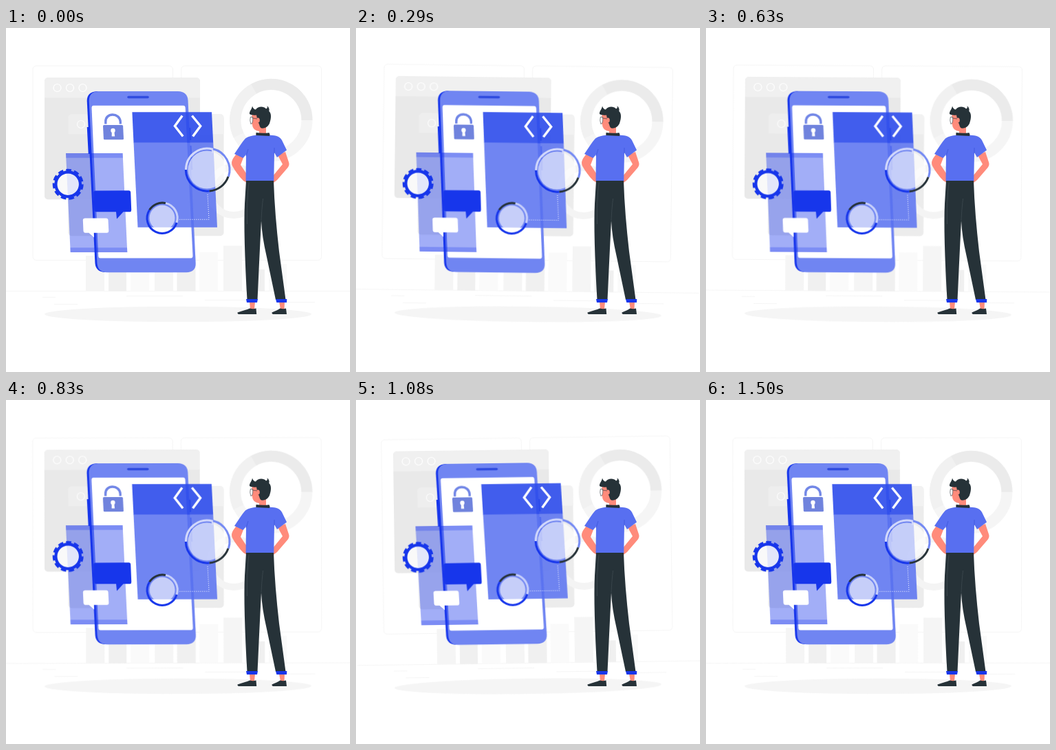
Recreate the animation shown at these times as an HTML page without scripts. Size 500 by 500 pixels, loop 1.54 s.

```html
<!DOCTYPE html>
<html lang="en">
<head>
<meta charset="utf-8">
<title>Mobile app development</title>
<style>
  html, body { margin: 0; width: 100%; height: 100%; overflow: hidden; background: #fff; }
  svg { display: block; width: 100%; height: 100%; }

  .sway { animation: sway 1540ms infinite; }
  #scene { transform-origin: 250px 228px; }
  #shadow { transform-origin: 250px 416px; }
  #device { transform-origin: 196px 224px; }

  /* 24 pictures per second: 9 up, 18 across, 9 back */
  @keyframes sway {
    0% { transform: rotate(0deg); animation-timing-function: steps(9); }
    24.3% { transform: rotate(1deg); animation-timing-function: steps(18); }
    73% { transform: rotate(-1deg); animation-timing-function: steps(9); }
    97.3%, 100% { transform: rotate(-.05deg); }
  }

  .blue { fill: #1736eb; }
  .ink { fill: #263238; }
  .skin { fill: #ff8b7b; }
  .line { fill: none; stroke: #ebebeb; stroke-width: .5; }
  .ring { fill: none; stroke-width: 3; }
  .white-line { fill: none; stroke: #fff; }
  .g1 { fill: #f5f5f5; }
  .g2 { fill: #f0f0f0; }
  .g3 { fill: #fafafa; }
</style>
</head>
<body>
<svg viewBox="0 0 500 500" xmlns="http://www.w3.org/2000/svg">
  <defs>
    <g id="browser">
      <rect width="226" height="177" rx="5" fill="#e9e9e9"/>
      <path class="g2" d="M0 29V5a5 5 0 0 1 5-5H221a5 5 0 0 1 5 5V29Z"/>
      <g class="white-line" stroke-width="1.2">
        <circle cx="18.5" cy="14.7" r="5.5"/>
        <circle cx="37" cy="14.7" r="5.5"/>
        <circle cx="55.5" cy="14.7" r="5.5"/>
      </g>
    </g>
  </defs>

  <g id="scene" class="sway">
    <path class="line" d="M0 382.4H500M53 391.3H72M70 401.5H104M175 389.6H257M289 395.5H350M404 398.6H449"/>
    <rect class="line" x="39" y="55" width="203.5" height="282.5" rx="5"/>
    <rect class="line" x="254.7" y="55" width="203.8" height="282.5" rx="5"/>

    <path class="g1" d="M116 331h27v51.4h-27zM216 331h27v51.4h-27zM316 316.5h27v65.9h-27z"/>
    <path class="g2" d="M149 331h26v51.4h-26zM248.5 331h27v51.4h-27zM348.5 351h27.5v31.4h-27.5z"/>
    <path class="g3" d="M181 331h27v51.4h-27zM281 326h27v56.4h-27zM382 343h26v39.4h-26z"/>

    <use href="#browser" x="56" y="72.3"/>
    <use href="#browser" x="90.5" y="125.3" opacity=".85"/>

    <g fill="none" stroke-width="16">
      <circle cx="385.5" cy="134" r="52" stroke="#f5f5f5"/>
      <path d="M338 156A52 52 0 0 1 360 88.500" stroke="#f1f1f1"/>
      <path d="M360 88.500A52 52 0 0 1 437.500 134" stroke="#ebebeb"/>
    </g>
    <circle cx="331" cy="237" r="35" fill="none" stroke="#f4f4f4" stroke-width="10"/>
  </g>

  <ellipse id="shadow" class="sway g1" cx="250" cy="416" rx="194" ry="11.3"/>

  <g id="device" class="sway">
    <!-- phone -->
    <path class="blue" d="M132 92H145V355H143Q130.500 354 129.500 342L117.700 106Q117.500 93 132 92Z"/>
    <path fill="none" stroke="#1736eb" stroke-width="2.500" d="M119 144L121 183M267 145L268 163M268.300 171L270 206"/>
    <path fill="#7085f2" d="M134 92H250Q263.500 92.500 264.500 105L275.700 342Q276 355 262 355.300H147Q133.500 355 132.500 342L120.700 106Q120.500 93 134 92Z"/>
    <path fill="#fff" d="M127 112.800H258Q260.500 113 260.700 116L271.500 331Q271.500 334.300 269 334.500H137Q134.500 334.500 134.300 332L124.500 116Q124.500 113 127 112.800Z"/>
    <path fill="none" stroke="#304cdf" stroke-width="3.500" stroke-linecap="round" d="M178 100.500H206"/>

    <!-- lock -->
    <path fill="none" stroke="#7186e6" stroke-width="3.400" d="M144.800 139.500V136.500C144 122.500 165.500 122.500 166.300 136.500V139.500"/>
    <path fill="#7083dd" d="M142.500 141H168.500Q170 141 170.100 142.500L171 161Q171 162.300 169.500 162.300H143.500Q142 162.300 141.900 161L141 142.500Q141 141 142.500 141Z"/>
    <circle cx="155.500" cy="149" r="3.200" fill="#fff"/>
    <path fill="#fff" d="M153.800 150H157.300L158.200 157.500H153.700Z"/>

    <!-- side card -->
    <path class="blue" opacity=".4" d="M87 182H169.600L176.300 326H93.700Z"/>
    <path class="blue" opacity=".27" d="M87 182H169.600L169.900 188.700H87.300ZM93.400 319.300H176L176.300 326H93.700Z"/>

    <!-- code card -->
    <path fill="#5870f0" opacity=".85" d="M185.500 166.500H301.200L307 289.700H191.500Z"/>
    <path fill="#2d4cec" opacity=".9" d="M183.400 122.200H299L301.200 166.700H185.500Z"/>
    <path class="white-line" stroke-width="3.400" d="M256.200 127.500L245.400 142.500L257.200 157.500M270.400 127.500L282.700 142.500L271.600 157.500"/>
    <path class="white-line" stroke-width="1" stroke-dasharray="1 2" d="M293 242L295 278.300H251"/>

    <!-- large dial -->
    <circle cx="292" cy="206" r="27.500" fill="#fff" opacity=".6"/>
    <g class="ring">
      <path stroke="#d3d9fb" d="M261.500 206A30.800 30.800 0 0 1 300.500 176.300V182"/>
      <path stroke="#7389f3" d="M301 175.800A31.500 31.500 0 0 1 323.500 216"/>
      <path stroke="#263238" d="M323 216A31.500 31.500 0 0 1 295.500 237"/>
      <path stroke="#1736eb" d="M295.500 237A31.500 31.500 0 0 1 261.300 206"/>
    </g>

    <!-- small dial -->
    <circle cx="227" cy="276" r="18.500" fill="#fff" opacity=".6"/>
    <g class="ring" stroke-width="2.500">
      <path stroke="#263238" d="M208.500 264.500A22 22 0 0 1 232 254.600"/>
      <path stroke="#c8d0fa" d="M232 254.600A22 22 0 0 1 248 283"/>
      <path stroke="#1736eb" d="M248 283A22 22 0 1 1 208.500 264.500"/>
    </g>

    <!-- gear -->
    <circle cx="90.200" cy="227.200" r="16" fill="#fff" opacity=".72"/>
    <circle cx="90.200" cy="227.200" r="17.800" fill="none" stroke="#1736eb" stroke-width="4.200"/>
    <circle cx="90.200" cy="227.200" r="20.600" fill="none" stroke="#1736eb" stroke-width="3.800" pathLength="110" stroke-dasharray="6.500 3.500"/>

    <!-- speech bubbles -->
    <path class="blue" d="M130 236.500L178.500 236.200Q181 236.200 181.200 239L182.200 264.500Q182.200 267.200 180 267.300H170.500L161 277.500L160 267.300H131Q128.500 267.300 128.300 264.500L127.300 239.500Q127.300 236.700 130 236.500Z"/>
    <path fill="#fff" d="M114.500 276.400H146Q148.300 276.400 148.500 279L149.300 295Q149.300 297.700 147 297.800H127.700L128 304.500L120.500 297.800H115Q112.700 297.700 112.500 295L111.800 279Q111.900 276.500 114.500 276.400Z"/>
  </g>

  <g id="man">
    <!-- arms -->
    <path class="skin" d="M335 183C329 190 326.500 195 329 200.500C333 208 339 216 345 222L351 225.500V214L341 199L346 186Z"/>
    <path class="skin" d="M395 185L402 198L388 215V225.500L394 221L409.500 203Q412.500 199 411 195L406 180Z"/>

    <!-- head -->
    <path class="skin" d="M358 123C357 129 357 133 356 138.500L358 140C358 145 361 149 368 150V154H378V140L376 122Z"/>
    <path class="ink" d="M354 125C353.500 121 357 119 358 113.500C359 117 361 118.500 363 118.500C366 114 374 113 378 117.500C380 117 380.500 115 379.500 113C382 115 383.300 118 382.300 121C386 124 385.500 131 383.500 137C382 143 377 146.500 371 145.500C368 144 368.500 138 366 137L364 126.500C360 127 356 126.500 354 125Z"/>
    <ellipse class="skin" cx="366.200" cy="134" rx="2.600" ry="3.600"/>
    <path fill="#fff" stroke="#263238" stroke-width=".6" d="M355.300 129.500H358.500Q359.500 139 355.800 139.500Q354 134 355.300 129.500ZM358.500 131L365 132"/>

    <!-- shirt -->
    <path fill="#586ff0" d="M364 155.800H384C393 156 398 158 401 163L408 177.500L394 188L390 181L389.300 222.500H348.500L349 184L344.500 189L332 183C338 174 343 166 348 160.500C352 157.500 358 156.500 364 155.800Z"/>
    <path fill="none" stroke="#3d55dc" stroke-width=".8" d="M349 186L352 176M390 182L390 174"/>
    <path class="ink" d="M363.500 152Q373 153.500 382.500 152.300Q384 154.500 383 157Q373 156.500 363.300 156Z"/>

    <!-- legs -->
    <path class="skin" d="M354 398H362L361 409H355ZM397 398H405L404.500 409H399Z"/>
    <path class="ink" d="M349 222H389C390 255 393 290 397 325L406.500 395H392L379 333Q372 303 371 280Q368 340 365.500 395H350.500Q345 300 347 255Z"/>
    <path fill="none" stroke="#4b565c" stroke-width=".5" d="M373.500 248Q371.500 265 371 280M353 225Q350 250 350.500 285"/>
    <path class="blue" d="M349 394H366L365 399H350ZM392 394H408.300L408 399H393.300Z"/>
    <path class="ink" d="M336.500 413.500C344 411 350 409.500 354.500 407.500Q359 409 363.500 407.500L364.200 416H338Q336 415 336.500 413.500ZM386.500 413.500C391 411.500 395 410 398.500 407.500Q403 409 407 407.500L408 416H388Q386 415 386.500 413.500Z"/>
  </g>
</svg>
</body>
</html>
```
